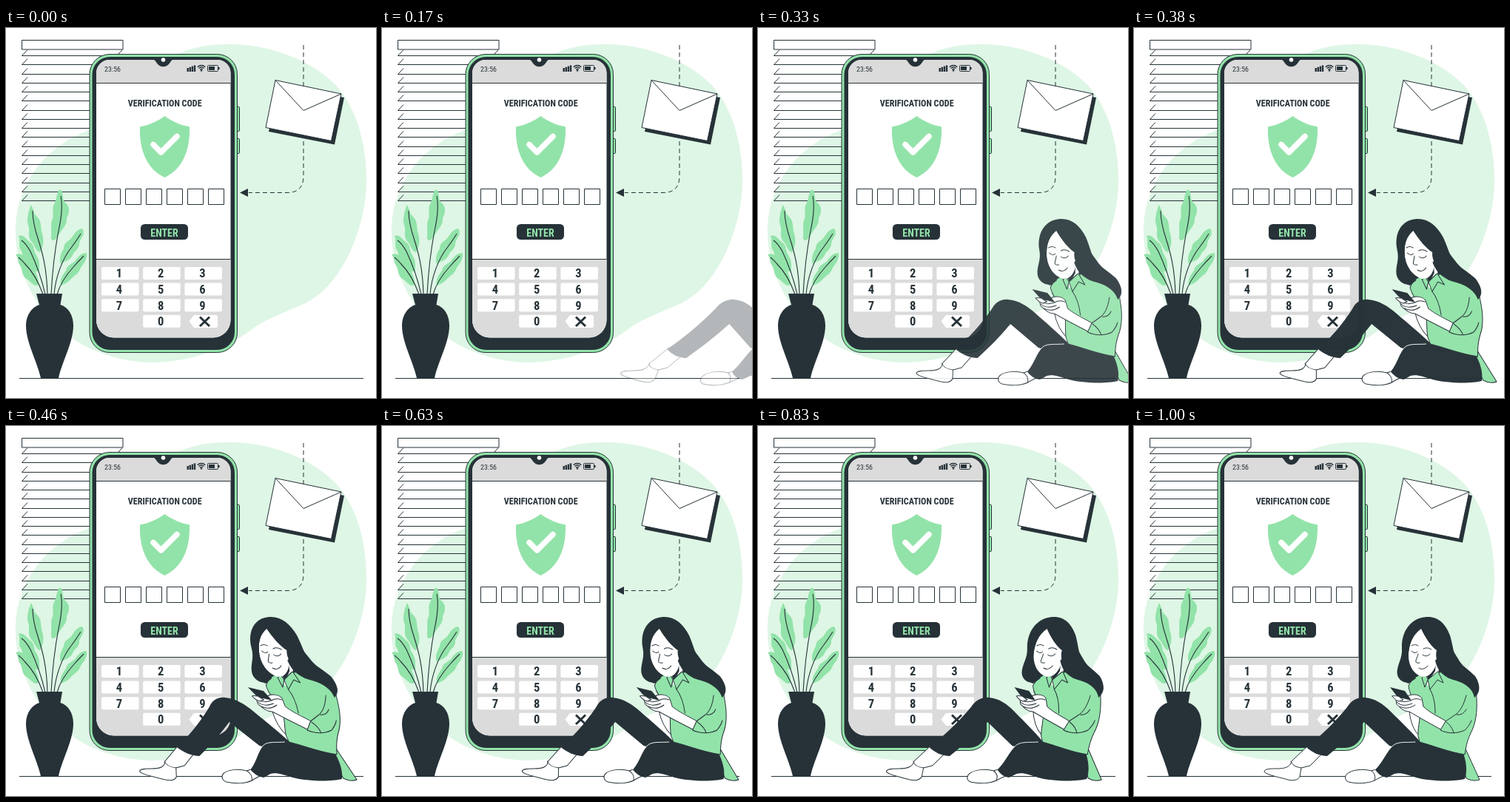
Recreate the animation shown at these times as an HTML page with a canvas. Size 500 by 500 pixels, loop 1.04 s.

```html
<!DOCTYPE html>
<html lang="en">
<head>
<meta charset="utf-8">
<title>Verification code</title>
<style>
html, body { margin: 0; width: 100%; height: 100%; overflow: hidden; background: #fff; }
canvas { display: block; width: 100vw; height: 100vh; }
</style>
</head>
<body>
<canvas id="stage" width="500" height="500"></canvas>
<script>
const DARK = '#263238', GREEN = '#92E3A9', PALE = '#DEF6E5', GREY = '#DBDBDB', WHITE = '#fff';
const FONT = '"Roboto Condensed", Roboto, "Open Sans", sans-serif';
const SIZE = 500, LOOP = 1040;

const stage = document.getElementById('stage').getContext('2d');
const layer = () => {
  const c = document.createElement('canvas');
  c.width = c.height = SIZE;
  return c.getContext('2d');
};
const scene = layer(), figure = layer();

// ---- drawing helpers ----
function shape(g, d, fill, stroke, width = 1) {
  const p = new Path2D(d);
  if (fill) { g.fillStyle = fill; g.fill(p); }
  if (stroke) { g.strokeStyle = stroke; g.lineWidth = width; g.stroke(p); }
}

function box(g, x, y, w, h, r, fill, stroke, width = 1) {
  g.beginPath();
  g.roundRect(x, y, w, h, r);
  if (fill) { g.fillStyle = fill; g.fill(); }
  if (stroke) { g.strokeStyle = stroke; g.lineWidth = width; g.stroke(); }
}

function disc(g, x, y, r, fill) {
  g.beginPath();
  g.arc(x, y, r, 0, Math.PI * 2);
  g.fillStyle = fill;
  g.fill();
}

// Centred text, taking a smaller size when the face is too wide.
function label(g, str, x, y, size, weight, room, fill) {
  g.textAlign = 'center';
  g.textBaseline = 'alphabetic';
  const set = s => {
    g.font = `${weight} ${s}px ${FONT}`;
    if ('fontStretch' in g) g.fontStretch = 'condensed';
  };
  set(size);
  const w = g.measureText(str).width;
  if (w > room) set(size * room / w);
  g.fillStyle = fill;
  g.fillText(str, x, y);
}

// ---- still scenery ----
function drawBlinds(g) {
  for (let i = 0; i < 17; i++) {
    const y = Math.floor(37.5 + i * 12.25) + 0.5;
    shape(g, `M29 ${y - 8}L21.5 ${y}H150L157 ${y - 8}`, null, DARK);
  }
  box(g, 21.5, 16.5, 136.5, 12.5, 0, WHITE, DARK);
}

function drawPlant(g) {
  const leaves = [
    'M73 218C79 222 75 232 80 236C87 241 86 250 82 257C83 267 75 272 71 280C67 288 60 290 61 281C62 275 60 268 62 260C66 254 61 246 65 238C69 231 68 222 73 218Z',
    'M34 239C38 246 37 251 42 255C49 262 46 270 49 278C52 288 50 297 46 303C40 302 39 293 34 288C28 281 33 273 30 266C27 258 31 246 34 239Z',
    'M17 281C24 279 27 285 32 289C39 293 37 301 41 307C46 314 45 322 45 329C37 330 34 323 28 320C21 315 24 306 20 300C16 295 20 288 17 281Z',
    'M13 306C21 303 27 310 32 314C39 318 39 328 42 335C45 342 44 346 43 348C36 349 33 342 28 339C21 336 23 327 19 321C16 317 17 311 13 306Z',
    'M103 271C108 278 101 284 99 290C100 299 92 301 90 307C86 315 79 315 74 319C71 311 75 303 78 298C78 289 86 288 89 283C93 277 96 272 103 271Z',
    'M109 304C110 313 105 318 101 324C98 333 91 335 87 340C83 345 78 346 74 348C72 340 77 333 81 328C82 320 90 319 94 314C98 308 102 304 109 304Z'
  ];
  leaves.forEach(d => shape(g, d, GREEN));
  const stems = [
    'M61 360C63 322 66 300 71 274C75 256 77 241 74 227',
    'M56 360C55 325 50 306 43 284C38 269 36 257 36 247',
    'M53 360C48 338 41 319 33 302C28 293 24 289 21 287',
    'M50 360C44 343 35 328 25 318C22 314 19 312 17 310',
    'M65 360C67 335 77 311 88 297C94 289 98 283 101 278',
    'M69 360C73 346 82 333 91 323C98 315 102 311 105 308'
  ];
  stems.forEach(d => shape(g, d, null, DARK, 1.1));
  shape(g, 'M41 359H76L73.500 374C84 377 91 388 91 402C91 425 76 450 71 473H47C42 450 27 425 27 402C27 388 35 377 45 374Z', DARK);
}

function drawStatus(g) {
  label(g, '23:56', 144, 59.3, 12.5, 400, 22, DARK);
  for (let i = 0; i < 4; i++) {
    const h = 5 + i * 1.2;
    box(g, 244.5 + i * 3.1, 59 - h, 2.4, h, 0, DARK);
  }
  for (let i = 1; i < 4; i++) {
    g.beginPath();
    g.arc(264, 58, i * 2.5, -Math.PI * 0.75, -Math.PI * 0.25);
    g.strokeStyle = DARK;
    g.lineWidth = 1.3;
    g.stroke();
  }
  disc(g, 264, 57.6, 1.2, DARK);
  box(g, 272.5, 50.5, 14, 8, 1, null, DARK);
  box(g, 274, 52, 8, 5, 0, DARK);
  box(g, 287, 53, 1.6, 3, 0, DARK);
}

function drawKeys(g) {
  for (let n = 0; n < 10; n++) {
    const col = n === 9 ? 1 : n % 3, row = Math.floor(n / 3);
    const x = 129 + col * 56.2, y = 323 + row * 21.6;
    box(g, x, y, 50.5, 17, 2, WHITE);
    label(g, String((n + 1) % 10), x + 24, y + 14.3, 16.5, 600, 20, DARK);
  }
  shape(g, 'M247.500 396.300L254 388H284Q286 388 286 390V403Q286 405 284 405H254Z', WHITE);
  shape(g, 'M262 390.500L275 403M275 390.500L262 403', null, DARK, 3);
}

function drawPhone(g) {
  box(g, 308, 106.5, 7.5, 33, 1, GREEN, DARK);
  box(g, 308, 149.5, 7.5, 20, 1, GREEN, DARK);
  box(g, 113, 35.5, 199.5, 403, 27, GREEN, DARK);
  box(g, 116.5, 39, 192.5, 396, 24, DARK);

  g.save();
  g.beginPath();
  g.roundRect(122, 43, 181.5, 375.5, [18, 18, 24, 24]);
  g.clip();
  box(g, 122, 43, 182, 376, 0, WHITE);
  box(g, 122, 43, 182, 31, 0, GREY);
  box(g, 122, 312.5, 182, 106, 0, GREY);
  shape(g, 'M122 74.500H304M122 312.500H304', null, DARK);
  g.restore();

  shape(g, 'M197 42C202 43 202 45 203.500 47C208 54 217 54 221.500 47C223 45 223 43 228 42Z', DARK);
  disc(g, 212.5, 43, 2.8, WHITE);
  drawStatus(g);

  label(g, 'VERIFICATION CODE', 214.7, 106, 14, 600, 100, DARK);
  shape(g, 'M214.500 119C225 126.500 236 131.500 248 133.500C249 163 240 190 214.500 202C189 190 180 163 181 133.500C193 131.500 204 126.500 214.500 119Z', GREEN);
  g.lineCap = g.lineJoin = 'round';
  shape(g, 'M199 157.500L209.500 168L231 146.500', null, WHITE, 7.5);
  g.lineCap = 'butt';
  g.lineJoin = 'miter';
  for (let i = 0; i < 6; i++) box(g, 133.5 + i * 28, 217.5, 21, 21, 0, WHITE, DARK);
  box(g, 182, 265, 64, 21, 5.5, DARK);
  label(g, 'ENTER', 214, 281.6, 17, 600, 37.5, GREEN);
  drawKeys(g);
}

function drawMail(g) {
  g.setLineDash([6, 4]);
  shape(g, 'M402 23V200Q402 222.500 380 222.500H328', null, DARK);
  g.setLineDash([]);
  shape(g, 'M316 222.500L327 217V228Z', DARK);
  shape(g, 'M368 75.500L457 94L444 157.500L355 140Z', DARK);
  shape(g, 'M364 70.500L453 89L439.500 152.500L351 134.500Z', WHITE, DARK);
  shape(g, 'M364 70.500L402 111.500L453 89', null, DARK);
}

function drawScene(g) {
  g.fillStyle = WHITE;
  g.fillRect(0, 0, SIZE, SIZE);
  shape(g, 'M13 275C13 215 50 160 113 138C160 122 175 75 215 45C245 25 275 22 302 22C365 22 425 50 453 86C478 120 487 165 487 205C487 230 483 252 477 270C465 312 440 352 410 369C385 382 365 386 335 405C300 433 250 452 195 452C130 450 75 420 45 375C25 345 13 310 13 275Z', PALE);
  drawBlinds(g);
  shape(g, 'M18 473.500H483', null, DARK);
  drawPlant(g);
  drawPhone(g);
  drawMail(g);
}

// ---- seated woman, in her resting pose ----
function drawWoman(g) {
  g.lineJoin = g.lineCap = 'round';

  // back hair, shirt tail
  shape(g, 'M395 258C411 257 421 267 427 283C432 299 431 313 443 323C456 332 466 342 466 355C465 366 452 368 440 362L398 345L376 346C366 349 356 344 355.500 333C356 321 363 314 362 300C361 277 375 259 395 258Z', DARK);
  shape(g, 'M446 432L467 478C461 480 454 479 449 476L440 446Z', GREEN, DARK);

  // feet
  shape(g, 'M235 432L213 453C211 461 204 463 193 463C186 463 176 463 176 467C179 472 199 475 208 478C216 480 222 478 224 474L226 462L238 459L254 443Z', WHITE, DARK);
  shape(g, 'M212 453C213 458 219 461 226 462', null, DARK);
  shape(g, 'M338 460L321 466C310 463 295 464 288 470C284 474 285 479 290 481C302 484 316 483 325 479C330 476 337 473 345 470Z', WHITE, DARK);
  shape(g, 'M321 466C325 469 327 474 325 479', null, DARK);

  // legs
  shape(g, 'M233 434C250 421 272 400 288 380C294 371 302 366 312 367C326 368 337 376 347 386C361 400 373 411 388 428L372 440L345 432L311 400C294 418 277 433 261 446C251 446 240 441 233 434Z', DARK);
  shape(g, 'M326 464C337 453 341 439 351 431C358 426 370 428 380 426L444 440C449 452 451 466 447 477C432 481 398 480 381 475C368 471 361 468 352 470L342 475C335 474 329 470 326 464Z', DARK);
  shape(g, 'M326 464C337 453 341 439 351 431C358 426 369 428 380 427', null, WHITE, 0.9);

  // near forearm and shirt
  shape(g, 'M372 384C373 396 376 408 384 417L393 405L387 377Z', WHITE, DARK);
  shape(g, 'M395 334C384 335 375 342 371 351C372 362 378 370 385 378C389 391 383 406 384 419L386 427C404 432 427 441 447 444C449 434 449 428 455 415C462 402 464 386 463 368C463 352 461 343 453 338C440 333 425 331 412 333Z', GREEN, DARK);

  // neck and collar
  shape(g, 'M390 326L397 352L411 337L413 316Z', WHITE);
  shape(g, 'M396 338C402 334 406 328 408 320L407 331L398 345Z', DARK);
  shape(g, 'M411 332L418 347L410 343L400 356L397 343L409 333Z', GREEN, DARK);
  shape(g, 'M397 343L393 353L389 340L394 336Z', GREEN, DARK);
  shape(g, 'M400 356C405 364 407 376 407 388', null, DARK);

  // far forearm, hands
  shape(g, 'M418 412L391 397L372 386C364 386 359 380 355 376L354 370C360 369 365 367 372 364C378 362 386 363 389 368L391 379C400 388 413 393 425 401Z', WHITE, DARK);
  shape(g, 'M346 353L366 358L375 371L356 366Z', DARK);
  shape(g, 'M355 369C361 374 367 373 374 371C379 368 383 368 388 370M355 373C361 379 368 378 376 375M359 379C366 383 374 381 380 377', null, DARK);
  shape(g, 'M349 365C352 368 353 371 358 372L364 370L357 365C354 365 351 364 349 365Z', WHITE, DARK);

  // sleeve
  shape(g, 'M451 352C448 369 442 384 433 391L420 400L414 411C424 417 438 415 449 407C458 399 463 371 461 355', GREEN);
  shape(g, 'M449 364C446 376 441 386 433 391L421 399L414 411C424 416 437 416 447 411C451 407 454 403 456 398M422 400C427 404 431 409 432 415M436 390C442 391 446 388 449 383', null, DARK);

  // face
  shape(g, 'M388 274C377 282 372 294 371 307C370 323 378 336 390 339C400 339 406 330 409 320C413 314 413 306 409 302C401 296 393 285 388 274Z', WHITE);
  shape(g, 'M387 270C394 288 402 298 409 303C407 310 409 318 413 325L426 316L416 276Z', DARK);
  shape(g, 'M375 304C377 307 381 307 383 305M390 309C393 312 398 311 400 308M375 297C378 295 381 295 384 297M391 301C395 299 399 300 402 302M384 308C383 313 380 317 381 319C383 321 385 320 386 320M385 327C389 330 394 328 397 324', null, DARK);
  shape(g, 'M388 272C377 280 373 292 371 306C369 320 374 334 381 341L371 348C361 344 361 333 364 322C367 310 363 302 364 291C366 280 376 269 388 272Z', DARK);

  // front lock over the shoulder
  shape(g, 'M407 317C410 332 421 341 435 344C449 348 458 356 460 367C469 360 468 349 461 338C454 331 445 326 440 318L426 295Z', DARK);
}

// ---- motion ----
const cubic = (a, b, s) => 3 * (1 - s) ** 2 * s * a + 3 * (1 - s) * s * s * b + s ** 3;

function ease(u) {
  let lo = 0, hi = 1;
  for (let i = 0; i < 24; i++) {
    const mid = (lo + hi) / 2;
    if (cubic(0.36, 0.5, mid) < u) lo = mid; else hi = mid;
  }
  return cubic(-0.01, 1.38, lo);
}

const tan = deg => Math.tan(deg * Math.PI / 180);
const steps = [
  { at: 0, x: 250, skew: tan(-20), alpha: 0 },
  { at: 600, x: 0, skew: tan(10), alpha: 1 },
  { at: 800, x: 0, skew: tan(-2), alpha: 1 },
  { at: 1000, x: 0, skew: 0, alpha: 1 }
];

function pose(ms) {
  const i = steps.findIndex(s => s.at > ms);
  if (i < 0) return steps[steps.length - 1];
  const a = steps[i - 1], b = steps[i];
  const p = ease((ms - a.at) / (b.at - a.at));
  const mix = key => a[key] + (b[key] - a[key]) * p;
  return { x: mix('x'), skew: mix('skew'), alpha: Math.min(1, Math.max(0, mix('alpha'))) };
}

// The picture holds at 24 steps a second, each taken mid-step.
function held(t) {
  let k = 0;
  while (k < 24 && Math.round((k + 1) * 25 / 6) * 10 <= t) k++;
  return (k + 0.48) * 1000 / 24;
}

function render(now) {
  const { x, skew, alpha } = pose(held(now % LOOP));
  stage.drawImage(scene.canvas, 0, 0);
  if (alpha > 0.04) {
    figure.setTransform(1, 0, 0, 1, 0, 0);
    figure.clearRect(0, 0, SIZE, SIZE);
    figure.setTransform(1, 0, skew, 1, x - skew * 370, 0);
    drawWoman(figure);
    stage.globalAlpha = alpha;
    stage.drawImage(figure.canvas, 0, 0);
    stage.globalAlpha = 1;
  }
}

function tick() {
  render(performance.now());
  requestAnimationFrame(tick);
}

drawScene(scene);
tick();
</script>
</body>
</html>
```
